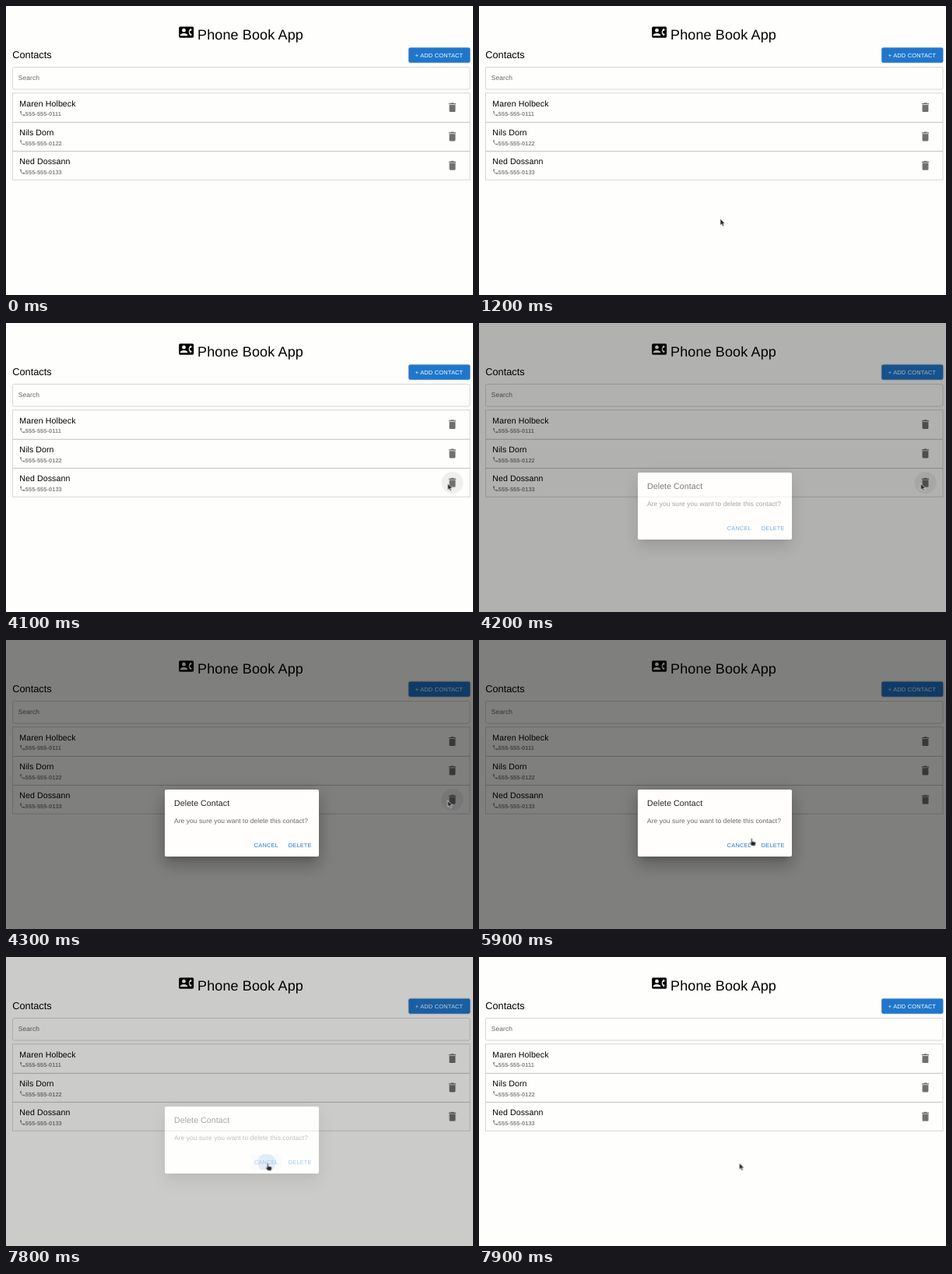
An HTML page for the animation above (8 s loop, 600 by 371 pixels).

```html
<!DOCTYPE html>
<html lang="en">
<head>
<meta charset="utf-8">
<title>Phone Book App</title>
<style>
  html, body { margin: 0; width: 100%; height: 100%; overflow: hidden; background: #fefefd; }
  svg, .modal { position: absolute; left: 0; top: 0; width: 600px; height: 371px; }
  text { font-family: "Liberation Sans", Arial, sans-serif; text-rendering: geometricPrecision; }
  .title { font-size: 18px; letter-spacing: .00735em; }
  .heading { font-size: 12.8px; }
  .name { font-size: 10.6px; letter-spacing: .0075em; }
  .phone { font-size: 7.4px; font-weight: bold; letter-spacing: .0107em; fill: #868686; }
  .body { font-size: 8.45px; letter-spacing: .00938em; fill: #666; }
  .button { font-size: 7.4px; letter-spacing: .02857em; fill: #1976d2; }
  .raised { fill: #1f77cc; filter: drop-shadow(0 .7px .8px rgba(0, 0, 0, .25)); }

  .modal { background: rgba(0, 0, 0, .5); }
  .panel {
    position: absolute; left: 203.5px; top: 192px; width: 198px; height: 85.5px;
    border-radius: 2px; background: #fffefd;
    box-shadow: 0 5.8px 7.9px -3.7px rgba(0, 0, 0, .2),
                0 12.6px 20px 1.6px rgba(0, 0, 0, .14),
                0 4.7px 24px 4.2px rgba(0, 0, 0, .12);
  }

  .modal, .trash-hover, .cancel-hover, .ripple, .cursor, .arrow, .hand {
    animation: 8s step-end -10ms infinite;
  }
  .modal { animation-name: modal; }
  .trash-hover { animation-name: trash-hover; }
  .cancel-hover { animation-name: cancel-hover; }
  .ripple { animation-name: ripple; }
  .cursor { animation-name: move; }
  .arrow { animation-name: arrow; }
  .hand { animation-name: hand; }

  @keyframes modal {
    0%, 98.75%, 100% { opacity: 0; }
    52.5% { opacity: .6; }
    53.75% { opacity: 1; }
    97.5% { opacity: .4; }
  }
  @keyframes trash-hover { 0%, 60%, 100% { opacity: 0; } 51.25% { opacity: 1; } }
  @keyframes cancel-hover { 0%, 100% { opacity: 0; } 75% { opacity: 1; } }
  @keyframes ripple { 0%, 100% { opacity: 0; } 96.25% { opacity: 1; } }
  @keyframes arrow { 0%, 73.75% { opacity: 0; } 8.75%, 98.75%, 100% { opacity: 1; } }
  @keyframes hand { 0%, 98.75%, 100% { opacity: 0; } 73.75% { opacity: 1; } }

  /* The pointer advances ten times a second. */
  @keyframes move {
    0% { transform: translate(285px, 342px); }
    8.75% { transform: translate(285px, 342px); animation-timing-function: steps(9); }
    20% { transform: translate(330px, 218px); animation-timing-function: steps(7); }
    28.75% { transform: translate(468.5px, 207.5px); }
    30% { transform: translate(490.5px, 207px); animation-timing-function: steps(4); }
    35% { transform: translate(549px, 202px); animation-timing-function: steps(3); }
    38.75% { transform: translate(567.5px, 206px); }
    61.25% { transform: translate(567.5px, 206px); animation-timing-function: steps(9); }
    72.5% { transform: translate(357.5px, 254.5px); }
    73.75% { transform: translate(348.5px, 254.5px); animation-timing-function: steps(4); }
    78.75%, 100% { transform: translate(334.5px, 264.5px); }
  }
</style>
</head>
<body>
<svg viewBox="0 0 600 371">
  <defs>
    <path id="handset" d="M6.62 10.79c1.44 2.83 3.76 5.14 6.59 6.59l2.2-2.2c.27-.27.67-.36 1.02-.24 1.12.37 2.33.57 3.57.57.55 0 1 .45 1 1V20c0 .55-.45 1-1 1-9.39 0-17-7.61-17-17 0-.55.45-1 1-1h3.5c.55 0 1 .45 1 1 0 1.25.2 2.45.57 3.57.11.35.03.74-.25 1.02z"/>
    <path id="bin" d="M6 19c0 1.1.9 2 2 2h8c1.1 0 2-.9 2-2V7H6zM19 4h-3.5l-1-1h-5l-1 1H5v2h14z"/>
    <g id="row-icons">
      <use href="#handset" transform="translate(17 133.9) scale(.35)" fill="#8a8a8a"/>
      <use href="#bin" transform="translate(565.6 122.3) scale(.656)" fill="#707070"/>
    </g>
  </defs>

  <g transform="translate(222.2 24.1) scale(.79)">
    <rect y="3" width="24" height="18" rx="2"/>
    <g fill="#fefefd">
      <circle cx="8" cy="9" r="3"/>
      <path d="M2 18v-1c0-2 4-3.1 6-3.1s6 1.1 6 3.1v1z"/>
      <path d="M17.85 14h1.64L21 16l-1.99 2c-4-3-4-9 0-12L21 8l-1.51 2h-1.64q-.7 2 0 4z"/>
    </g>
  </g>
  <text class="title" x="246" y="43">Phone Book App</text>
  <text class="heading" x="8.2" y="67.3">Contacts</text>

  <rect class="raised" x="517.3" y="53.5" width="79" height="19.2" rx="2"/>
  <text class="button" x="525.8" y="65.7" style="fill:#fff">+ ADD CONTACT</text>

  <g fill="none" stroke="#d6d6d6">
    <rect x="8.5" y="78.5" width="587.5" height="28.5" rx="2"/>
    <rect x="8.5" y="111.7" width="587.5" height="111.5"/>
    <path d="M8.5 149.3h587.5M8.5 186.4h587.5" stroke="#c2c2c2"/>
  </g>
  <text class="body" x="15.8" y="95.3">Search</text>

  <circle class="trash-hover" cx="573.5" cy="205" r="14" fill="#000" fill-opacity=".06"/>
  <g>
    <use href="#row-icons"/>
    <text class="name" x="17.3" y="128.6">Maren Holbeck</text>
    <text class="phone" x="24.8" y="141.3">555-555-0111</text>
  </g>
  <g transform="translate(0 37.3)">
    <use href="#row-icons"/>
    <text class="name" x="17.3" y="128.6">Nils Dorn</text>
    <text class="phone" x="24.8" y="141.3">555-555-0122</text>
  </g>
  <g transform="translate(0 74.6)">
    <use href="#row-icons"/>
    <text class="name" x="17.3" y="128.6">Ned Dossann</text>
    <text class="phone" x="24.8" y="141.3">555-555-0133</text>
  </g>
</svg>

<div class="modal">
  <div class="panel"></div>
  <svg viewBox="0 0 600 371">
    <clipPath id="cancel"><rect x="314.5" y="253.5" width="40" height="19.2" rx="2"/></clipPath>
    <text class="name" x="216" y="212.8" fill="#212121">Delete Contact</text>
    <text class="body" x="216" y="235.1">Are you sure you want to delete this contact?</text>
    <g clip-path="url(#cancel)" fill="#1976d2">
      <rect class="cancel-hover" x="314" y="253" width="41" height="20" fill-opacity=".05"/>
      <circle class="ripple" cx="335" cy="264" r="11.5" fill-opacity=".28"/>
    </g>
    <text class="button" x="318.7" y="265.7">CANCEL</text>
    <text class="button" x="362.7" y="265.7">DELETE</text>
  </svg>
</div>

<svg viewBox="0 0 600 371">
  <g class="cursor" fill="#252525" stroke="#fff" stroke-width=".6" stroke-linejoin="round">
    <path class="arrow" d="M0 0V8.4L1.9 6.7 3.3 9.8 4.8 9.1 3.4 6.2H6.1Z"/>
    <path class="hand" d="M1 .8C1-.3 2.7-.3 2.7.8V4L6 4.7C7 4.9 7.2 5.5 7 6.5L6.4 9.8H2L-.8 6.6C-1.2 6-.2 5.2.4 5.8L1 6.4Z"/>
  </g>
</svg>
</body>
</html>
```
